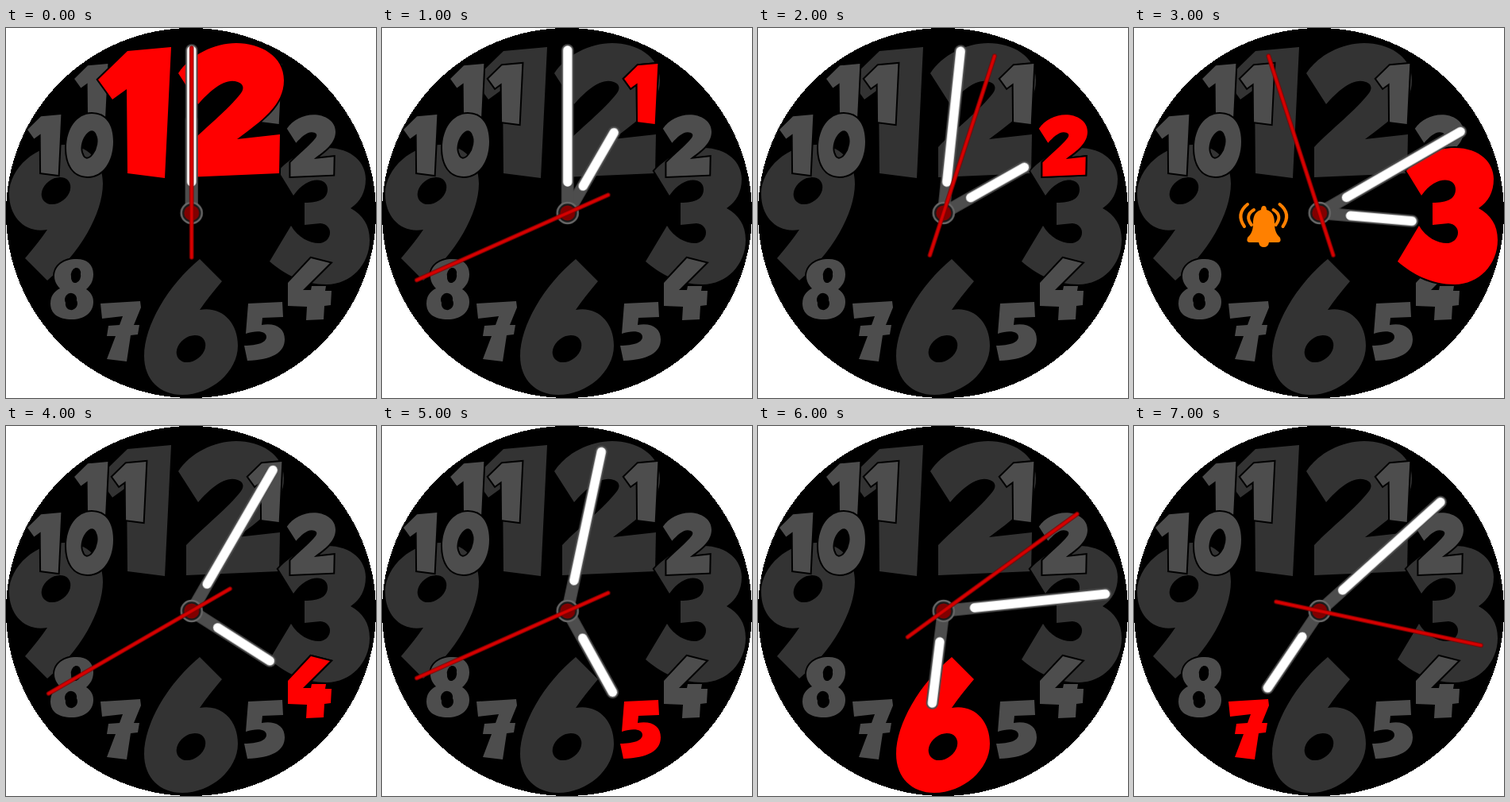
Animation, 466 px wide and 466 px high, one loop 8000 ms. Source, as an HTML page without scripts:

```html
<!DOCTYPE html>
<html lang="en">
<head>
<meta charset="utf-8">
<title>Clock</title>
<style>
  html, body { margin: 0; width: 100%; height: 100%; overflow: hidden; background: #fff; }
  svg { display: block; width: 100vw; height: 100vh; }

  .num { stroke: #000; stroke-width: 4; paint-order: stroke; fill-rule: evenodd; }
  .scaled { stroke-width: 8.7; }
  .big { fill: #333; }
  .small { fill: #4d4d4d; }
  .lit { fill: #f00; }

  /* Each hour is shown for one second of the eight */
  .slot { visibility: hidden; animation: slot 8s step-end infinite; animation-delay: calc(var(--i) * 1s - 8s); }
  @keyframes slot { 0% { visibility: visible; } 12.5%, 100% { visibility: hidden; } }

  .hand { fill: none; stroke-linecap: round; animation: 8s step-end infinite; }
  .hour { animation-name: hour; }
  .minute { animation-name: minute; }
  .second { animation-name: second; }
  .stem { stroke: #4d4d4d; stroke-width: 15.5; }
  .bar { stroke: #fff; stroke-width: 11.5; }

  @keyframes hour {
    0% { transform: rotate(0deg); }
    12.5% { transform: rotate(30deg); }
    25% { transform: rotate(60.5deg); }
    37.5% { transform: rotate(95deg); }
    50% { transform: rotate(122.5deg); }
    62.5% { transform: rotate(151deg); }
    75% { transform: rotate(187deg); }
    87.5%, 100% { transform: rotate(214deg); }
  }
  @keyframes minute {
    0%, 12.5% { transform: rotate(0deg); }
    25% { transform: rotate(6deg); }
    37.5% { transform: rotate(60deg); }
    50% { transform: rotate(30deg); }
    62.5% { transform: rotate(12deg); }
    75% { transform: rotate(84deg); }
    87.5%, 100% { transform: rotate(48deg); }
  }
  @keyframes second {
    0% { transform: rotate(0deg); }
    12.5% { transform: rotate(246deg); }
    25% { transform: rotate(18deg); }
    37.5% { transform: rotate(342deg); }
    50% { transform: rotate(240deg); }
    62.5% { transform: rotate(246deg); }
    75% { transform: rotate(54deg); }
    87.5%, 100% { transform: rotate(102deg); }
  }
</style>
</head>
<body>
<svg viewBox="0 0 466 466">
  <defs>
    <path id="one" d="M153 29L208 24L200 189L153 183L152 77L134 90L116 65Z"/>
    <path id="two" d="M217 57C232 34 262 19 290 19C320 19 350 35 350 66C350 97 322 117 291 140L345 134L344 183L227 188L227 150C248 128 280 103 296 82C301 75 298 70 292 68C276 62 258 78 242 96Z"/>
    <g id="n12"><use href="#one"/><use href="#two"/></g>
    <use id="n1" class="scaled" href="#one" transform="translate(251.7 34) scale(.46)"/>
    <use id="n2" class="scaled" href="#two" transform="translate(254 100.5) scale(.46)"/>
    <path id="n3" d="M343 180C360 161 382 151 404 151C436 151 453 170 453 190C453 207 446 219 434 227C449 235 458 248 458 267C458 298 434 323 404 323C375 323 350 310 332 294L359 249C368 265 385 272 396 271C412 268 412 247 396 246L376 248L376 220C395 220 405 215 405 203C405 188 380 185 362 211Z"/>
    <path id="n4" d="M384 290L408 296L374 330L384 330L385 325L403 325L402 331L410 331L409 349L401 350L400 367L378 368L379 351L355 350L355 321Z"/>
    <path id="n5" d="M305 347L348 345L349 364L323 365L322 374C341 371 351 379 351 392C351 409 335 418 304 419L300 400C317 400 328 396 328 389C328 382 317 380 302 385Z"/>
    <path id="n6" d="M244 291L272 319C262 331 252 343 244 355C272 350 292 371 292 400C292 433 258 462 222 462C194 462 174 443 174 413C174 375 204 324 244 291ZM217.200 416.300a20 15 -38 1 0 31.600 -24.600a20 15 -38 1 0 -31.600 24.600Z"/>
    <path id="n7" d="M119 347L169 344L170 352L161 374L168 374L166 386L157 387L152 420L127 417L138 388L127 388L129 375L143 374L147 363L121 366Z"/>
    <path id="n8" d="M89 291C102 291 110 298 110 310C110 319 106 325 101 329C107 333 110 338 110 345C110 359 98 367 83 367C66 367 56 360 56 347C56 338 60 332 68 328C64 324 61 319 61 313C61 299 73 291 89 291ZM82 313a6 8 15 1 0 12 -3a6 8 15 1 0 -12 3ZM75 346a7.500 8 20 1 0 14 -3a7.500 8 20 1 0 -14 3Z"/>
    <use id="n9" href="#n6" transform="rotate(180 148 304.5)"/>
    <path id="zero" d="M76 151C76 127 89 108 108 108C126 108 135 122 135 143C135 168 122 187 103 187C85 187 76 172 76 151ZM96 159a9 17 18 1 0 18 -24a9 17 18 1 0 -18 24Z"/>
    <g id="n10"><use href="#n1" x="-278" y="64"/><use href="#zero"/></g>
    <g id="n11"><use href="#n1" x="-219"/><use href="#n1" x="-171"/></g>
    <path id="waves" d="M151 229Q139 236 148 248M143 222Q128 234 139 250"/>
  </defs>

  <circle cx="233" cy="233" r="233" shape-rendering="crispEdges"/>

  <g class="num big">
    <use href="#n12"/><use href="#n3"/><use href="#n6"/><use href="#n9"/>
  </g>
  <g class="num small">
    <use href="#n11"/><use href="#n10"/><use href="#n1"/><use href="#n2"/>
    <use href="#n4"/><use href="#n5"/><use href="#n7"/><use href="#n8"/>
  </g>
  <g class="num lit">
    <use class="slot" style="--i:0" href="#n12"/>
    <use class="slot" style="--i:1" href="#n1"/>
    <use class="slot" style="--i:2" href="#n2"/>
    <use class="slot" style="--i:3" href="#n3"/>
    <use class="slot" style="--i:4" href="#n4"/>
    <use class="slot" style="--i:5" href="#n5"/>
    <use class="slot" style="--i:6" href="#n6"/>
    <use class="slot" style="--i:7" href="#n7"/>
  </g>

  <g class="slot" style="--i:3" fill="#ff8000">
    <path d="M163.500 224C166 224 167 226 167 229C175 231 177 238 177 246C177 256 180 260 184 264Q186 270 181 270H146Q141 270 143 264C147 260 150 256 150 246C150 238 152 231 160 229C160 226 161 224 163.500 224ZM157 270H170Q169 276 163.500 276T157 270Z"/>
    <g fill="none" stroke="#ff8000" stroke-width="4" stroke-linecap="round">
      <use href="#waves"/>
      <use href="#waves" transform="matrix(-1 0 0 1 326.500 0)"/>
    </g>
  </g>

  <g transform="translate(233.700 233)">
    <g class="hand hour">
      <path class="stem" d="M0 0V-117"/><path class="bar" d="M0 -39V-117"/>
    </g>
    <g class="hand minute">
      <path class="stem" d="M0 0V-205"/><path class="bar" d="M0 -39V-205"/>
    </g>
    <circle r="13" fill="#1a1a1a" stroke="#666" stroke-width="2.500"/>
    <circle r="9.500" fill="#800000"/>
    <g class="hand second">
      <path d="M0 56V-208" stroke="#800000" stroke-width="5.500"/>
      <path d="M0 56V-208" stroke="#d90000" stroke-width="3.500"/>
    </g>
  </g>
</svg>
</body>
</html>
```
